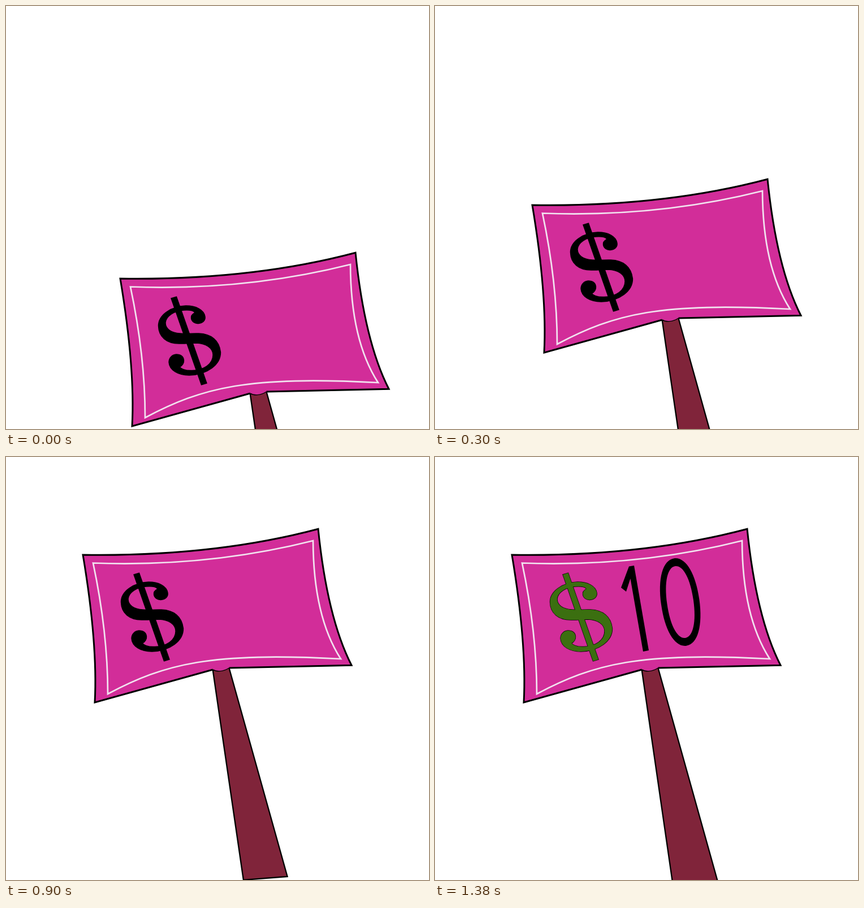
Animation of 748x748 px, one loop 1.5 s. Source, as an HTML page with a canvas:

```html
<!DOCTYPE html>
<html lang="en">
<head>
<meta charset="utf-8">
<title>Price sign</title>
<style>
  html, body { margin: 0; width: 100%; height: 100%; overflow: hidden; background: #fff; }
  canvas { display: block; width: 748px; height: 748px; }
</style>
</head>
<body>
<canvas id="stage" width="748" height="748" role="img" aria-label="$10"></canvas>
<script>
const ctx = document.getElementById('stage').getContext('2d');
const SIZE = 748, STEP = 300;
const PINK = '#d22d99', WOOD = '#80243a', GREEN = '#3b6f10', PALE = '#f2e3ef', INK = '#000';

// Sign offset from its resting place at each step
const steps = [[66, 309], [36, 179], [11, 54], [0, 0], [0, 0]];

const edge = new Path2D(
  'M394.5 373 L611 368.3 Q568 284 552 127.2 Q366 176.5 136 173 ' +
  'Q162.5 331 157 434 L365.7 376');
const notch = new Path2D('M365.7 376 C372 380 384 380 394.5 373');
const board = new Path2D(edge);
board.addPath(new Path2D('M365.7 376 C372 380 384 380 394.5 373 L380 366 Z'));

const border = new Path2D(
  'M154 187.5 Q357 195 543 148 Q543.5 282 592 357 C362 345 282 365 180 419 Q180 310 154 187.5 Z');

const dollar = [
  'M286 240 C284 228 270 221 252 221 C225 222 203 238 203.5 257 ' +
  'C204 276 218 288 240 288 C250 288.5 260 287 270 287 ' +
  'C288 287.5 300 296 300 308 C300 324 284 335 263 335.5 ' +
  'C250 336 243 332 241.5 329 C246 327 249 322 248.5 317 ' +
  'C247.5 310 242 307 235 307 C228 307.5 222 313 222 321 ' +
  'C223 335 238 344 258 344 C290 343 314 325 313.5 303 ' +
  'C311 282 297 271 275 270 C265 269.5 252 271 242 270 ' +
  'C226 269 216 262 216 251 C217 239 232 230 248 229 ' +
  'C260 228 267 230 267.5 233.5 C263 236 261 240 261.5 243 ' +
  'C262 249 268 253 274 252.5 C282 252 287 247 286 240 Z',
  'M226 208 L235.5 205 L289 358 L279.5 361 Z'
].map(d => new Path2D(d));

const one = new Path2D(
  'M343 193.5 L352 192 L378 342 L368 344 L345.5 215 L338 238 L329 231 Z');

function oval(a, b) {
  const k = 0.6, p = a * k, q = b * k;
  return `M0 ${-b} C${p} ${-b} ${a} ${-q} ${a} 0 C${a} ${q} ${p} ${b} 0 ${b} ` +
    `C${-p} ${b} ${-a} ${q} ${-a} 0 C${-a} ${-q} ${-p} ${-b} 0 ${-b} Z`;
}
const zero = new Path2D(oval(34, 78) + oval(23.5, 64));

function fill(path, color, rule = 'nonzero') {
  ctx.fillStyle = color;
  ctx.fill(path, rule);
}

function line(path, color, width) {
  ctx.strokeStyle = color;
  ctx.lineWidth = width;
  ctx.stroke(path);
}

function drawHandle(long) {
  const path = new Path2D(long
    ? 'M365.3 374 L422.9 772 L505.9 772 L393.9 371 Z'
    : 'M365.3 374 L419.9 748 L497.6 742 L393.9 371 Z');
  fill(path, WOOD);
  line(path, INK, 2.3);
}

function drawBoard() {
  fill(board, PINK);
  line(notch, INK, 1.5);
  line(edge, INK, 3);
  line(border, PALE, 2.7);
}

function drawDollar(color) {
  dollar.forEach(p => line(p, INK, 1.4));
  dollar.forEach(p => fill(p, color));
}

function drawTen() {
  fill(one, INK);
  ctx.save();
  ctx.translate(433.7, 256.5);
  ctx.rotate(-8 * Math.PI / 180);
  fill(zero, INK, 'evenodd');
  ctx.restore();
}

function draw(ms) {
  const i = Math.floor(ms / STEP) % steps.length;
  const last = i === steps.length - 1;
  ctx.fillStyle = '#fff';
  ctx.fillRect(0, 0, SIZE, SIZE);
  ctx.save();
  ctx.translate(...steps[i]);
  drawHandle(last);
  drawBoard();
  drawDollar(last ? GREEN : INK);
  if (last) drawTen();
  ctx.restore();
}

let start;
function tick(now) {
  if (start === undefined) start = now;
  draw(Math.max(0, now - start));
  requestAnimationFrame(tick);
}
draw(0);
requestAnimationFrame(tick);
</script>
</body>
</html>
```
